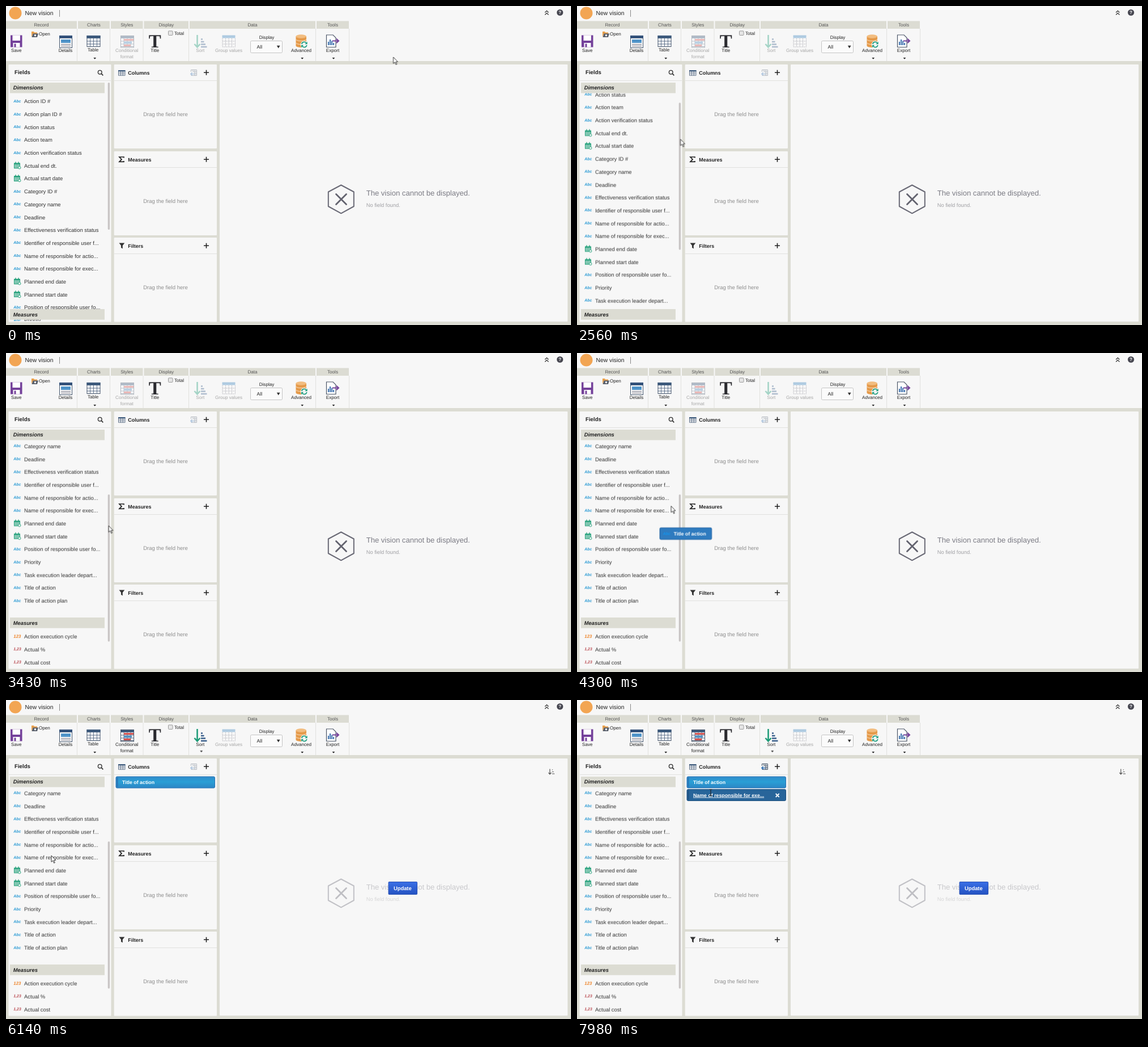
Animation of 997 by 562 pixels, one loop 8000 ms. Source, as an HTML page:

```html
<!DOCTYPE html>
<html lang="en">
<head>
<meta charset="utf-8">
<title>New vision</title>
<style>
html, body { margin: 0; width: 100%; height: 100%; overflow: hidden; background: #dcdcd3; }
svg { display: block; width: 997px; height: 562px; }
text { font: 9.45px "Liberation Sans", Arial, sans-serif; fill: #333; text-rendering: geometricPrecision; white-space: pre; }
.tool text { font-size: 8.1px; text-anchor: middle; fill: #222; }
.tool .tab { fill: #555; }
.left text, text.left { text-anchor: start; }
text.head { font-weight: bold; font-size: 8.95px; fill: #222; }
text.group { font-weight: bold; font-style: italic; font-size: 9.4px; fill: #222; }
text.hint { fill: #8e8e8e; font-size: 9.55px; text-anchor: middle; }
text.kind { font-weight: bold; font-style: italic; font-size: 6.9px; }
text.chip { font-weight: bold; font-size: 8.8px; fill: #fff; }
.panel { fill: #f7f7f7; }
.rule { stroke: #e1e1de; fill: none; }
.bar { fill: #dcdcd3; }
.dim { opacity: .38; }

/* one loop lasts 8 s, so 1% is 80 ms */
.cursor, .ghost { animation: move 8s linear infinite; }
.ghost { animation-delay: 70ms; }
.list { animation: list 8s linear infinite; }
.thumb { animation: thumb 8s linear infinite; }
.sum { animation: sum 8s linear infinite; }
.drop1, .undrop1, .wake, .msg, .wake2, .drop2, .drag1, .drag2, .slot1, .slot2, .arrow, .beam, .hover1 { animation: 8s step-end infinite; }
.drop1 { animation-name: drop1; }
.undrop1 { animation-name: undrop1; }
.wake { animation-name: wake; }
.msg { animation-name: msg; }
.wake2 { animation-name: wake2; }
.drop2 { animation-name: drop2; }
.drag1 { animation-name: drag1; }
.drag2 { animation-name: drag2; }
.slot1 { animation-name: slot1; }
.slot2 { animation-name: slot2; }
.arrow { animation-name: arrow; }
.beam { animation-name: beam; }
.hover1 { animation-name: hover1; }

@keyframes move {
  0%, 10.6% { transform: translate(683.5px, 90px); }
  13% { transform: translate(600px, 108px); }
  17% { transform: translate(330px, 168px); }
  20.4% { transform: translate(193px, 188px); }
  24.2%, 27% { transform: translate(182px, 189px); }
  28.125% { transform: translate(182px, 197px); }
  35.875% { transform: translate(183px, 272px); }
  40% { transform: translate(183px, 308px); }
  42.875% { transform: translate(181.5px, 304px); }
  47.1%, 49.4% { transform: translate(64px, 409px); }
  55% { transform: translate(195px, 230px); }
  57.6% { transform: translate(249px, 153px); }
  60%, 63% { transform: translate(254px, 153px); }
  68.1% { transform: translate(125px, 235px); }
  75%, 79.5% { transform: translate(80px, 274px); }
  82%, 84.4% { transform: translate(92px, 277px); }
  88% { transform: translate(180px, 235px); }
  88.875% { transform: translate(212px, 212px); }
  90.6% { transform: translate(234px, 174px); }
  92%, 100% { transform: translate(236px, 163px); }
}
@keyframes list {
  0%, 27.7% { transform: none; }
  28.125% { transform: translateY(-1px); }
  35.875% { transform: translateY(-113.3px); }
  40%, 100% { transform: translateY(-185.3px); }
}
@keyframes thumb {
  0%, 27.7% { transform: none; }
  28.125% { transform: translateY(.6px); }
  35.875% { transform: translateY(70px); }
  40%, 100% { transform: translateY(114.3px); }
}
@keyframes sum {
  0%, 35.86% { transform: translateY(534px); }
  35.87% { transform: translateY(538px); }
  40%, 100% { transform: translateY(466px); }
}
@keyframes drop1 { 0% { opacity: 0; } 61.75%, 100% { opacity: 1; } }
@keyframes undrop1 { 0% { opacity: 1; } 61.75%, 100% { opacity: 0; } }
@keyframes wake { 0% { opacity: .38; } 61.75%, 100% { opacity: 1; } }
@keyframes msg { 0% { opacity: 1; } 61.75%, 100% { opacity: .38; } }
@keyframes wake2 { 0% { opacity: .35; } 94.5%, 100% { opacity: 1; } }
@keyframes drop2 { 0% { opacity: 0; } 94.5%, 100% { opacity: 1; } }
@keyframes drag1 { 0% { opacity: 0; } 50% { opacity: 1; } 61.75%, 100% { opacity: 0; } }
@keyframes drag2 { 0% { opacity: 0; } 84.6% { opacity: .93; } 94.5%, 100% { opacity: 0; } }
@keyframes slot1 { 0% { opacity: 0; } 55.2% { opacity: 1; } 61.75%, 100% { opacity: 0; } }
@keyframes slot2 { 0% { opacity: 0; } 89.3% { opacity: 1; } 94.5%, 100% { opacity: 0; } }
@keyframes arrow { 0% { opacity: 1; } 61.75% { opacity: 0; } 63.3% { opacity: 1; } 84%, 100% { opacity: 0; } }
@keyframes beam { 0% { opacity: 0; } 61.75% { opacity: 1; } 63.3% { opacity: 0; } 84%, 100% { opacity: 1; } }
@keyframes hover1 { 0% { opacity: 0; } 61.75% { opacity: 1; } 63.3%, 100% { opacity: 0; } }
</style>
</head>
<body>
<svg viewBox="0 0 997 562">
  <defs>
    <clipPath id="rows"><rect x="5" y="153.5" width="170" height="401"/></clipPath>
    <linearGradient id="blue" x2="0" y2="1"><stop stop-color="#2f8bcb"/><stop offset=".45" stop-color="#2a9fd5"/><stop offset="1" stop-color="#2c86c5"/></linearGradient>
    <linearGradient id="btn" x2="0" y2="1"><stop stop-color="#3a6fe6"/><stop offset="1" stop-color="#2553c2"/></linearGradient>
    <g id="grid">
      <rect x=".5" y=".5" width="23" height="19" fill="#fff" stroke="#44546a"/>
      <rect width="24" height="5" fill="#3d5a7c"/>
      <path d="M0 10H24M0 15H24M6 5V20M12 5V20M18 5V20" stroke="#5c6f88" fill="none"/>
    </g>
    <g id="cal" fill="none" stroke="#23a07a">
      <path d="M.6 2.6H10.4V11H.6Z" stroke-width="1.2"/>
      <path d="M.5 3.6H10.5" stroke-width="2"/>
      <path d="M3 0V3M8 0V3" stroke-width="1.4"/>
      <path d="M.5 6.3H10.5M.5 8.7H10.5M3.2 4V11M5.6 4V11M8 4V11" stroke-width=".8"/>
      <circle cx="9.8" cy="10.2" r="2.2" fill="#f7f7f7"/>
    </g>
    <path id="caret" d="M-2.4 -1.3H2.4L0 1.5Z" fill="#222"/>
    <path id="plus" d="M-4.5 0H4.5M0 -4.5V4.5" stroke="#222" stroke-width="1.6"/>
  </defs>

  <rect class="panel" width="997" height="97"/>
  <circle cx="16.5" cy="12.5" r="11" fill="#f2a553"/>
  <text x="33.5" y="16.3" style="font-size:10.35px;fill:#222">New vision</text>
  <path d="M94.5 7V19" stroke="#888"/>
  <path d="M951 11.5L954.2 8.5L957.4 11.5M951 15.5L954.2 12.5L957.4 15.5" fill="none" stroke="#444" stroke-width="1.4"/>
  <circle cx="977.5" cy="11.5" r="5.6" fill="#484852"/>
  <text x="977.5" y="14.4" style="font-size:8px;font-weight:bold;fill:#fff;text-anchor:middle">?</text>

  <g class="tool">
    <g id="tabs"></g>
    <g fill="none">
      <path d="M8 51.5H28.5V72.5H8Z" fill="#74419a"/>
      <path d="M11.5 51.5H25V61H11.5Z" fill="#fff"/>
      <path d="M12.5 65H24.5V72.5H12.5Z" fill="#fff"/>
      <path d="M14.5 66.5H17.5V72.5H14.5Z" fill="#74419a"/>
    </g>
    <text x="18.3" y="81">Save</text>
    <path d="M45 45H49L50 46.5H55V49H47.5L45 54.5Z" fill="#e8a04c"/>
    <path d="M47.6 48.5H57L55 55H45.5Z" fill="#59606c"/>
    <circle cx="51.5" cy="51.7" r="1.7" fill="#fff"/>
    <text class="left" x="58" y="52">Open</text>
    <g>
      <rect x="94.5" y="52.5" width="22" height="21" fill="#fff" stroke="#41536a"/>
      <rect x="94" y="52" width="23" height="5" fill="#34527a"/>
      <rect x="97" y="59" width="17" height="6" fill="#4f93c8"/>
      <path d="M97 67.5H114M97 70.5H114" stroke="#667"/>
    </g>
    <text x="105" y="81">Details</text>
    <use href="#grid" x="142.5" y="52"/>
    <text x="153.7" y="80.3">Table</text>
    <use href="#caret" x="156.7" y="92.3"/>

    <g class="wake">
      <use href="#grid" x="202" y="52"/>
      <path d="M208 59.5H225M208 69.5H220" stroke="#d9534f" stroke-width="3"/>
      <path d="M208 64.5H222" stroke="#4f93c8" stroke-width="3"/>
      <rect x="202.5" y="52.5" width="23" height="20.5" fill="none" stroke="#44546a"/>
      <text x="213.3" y="81">Conditional</text>
      <text x="213.3" y="92">format</text>
    </g>

    <text x="262.8" y="73" style="font:bold 33px 'Liberation Serif',Times,serif;fill:#2b2b30">T</text>
    <text x="262.8" y="81">Title</text>
    <rect x="286.5" y="44" width="7.5" height="7.5" rx="1" fill="#e6e6e6" stroke="#9a9a9a"/>
    <text class="left" x="297" y="51.3">Total</text>

    <g class="wake">
      <path d="M337.5 51V72M332.5 67L337.5 72.5L342.5 67" fill="none" stroke="#1f9c78" stroke-width="2.6"/>
      <path d="M344 58.5H347M344 63H349.5M344 67.5H352M344 72H354.5" stroke="#3a5f8c" stroke-width="2.4"/>
      <text x="342.8" y="81">Sort</text>
    </g>
    <use class="drop1" href="#caret" x="344.7" y="90.5"/>
    <g class="dim">
      <rect x="381.5" y="51.5" width="23" height="5" fill="#3d86c0"/>
      <path d="M382 57V72H404.5V57M382 62H404M382 67H404M387.5 57V72M393 57V72M398.5 57V72" fill="none" stroke="#667" stroke-dasharray="2 1"/>
      <text x="393" y="81">Group values</text>
    </g>
    <text x="460" y="58.3">Display</text>
    <rect x="431.5" y="61.5" width="56" height="21" rx="2" fill="#fbfbfb" stroke="#c4c4c4"/>
    <text x="447.3" y="75" style="font-size:8.6px">All</text>
    <path d="M477.8 69.8H483.6L480.7 74.4Z" fill="#333"/>
    <g>
      <path d="M511.5 53.5V70C511.5 74 530 74 530 70V53.5Z" fill="#e59a4a"/>
      <ellipse cx="520.7" cy="53.5" rx="9.2" ry="3.2" fill="#f2bd80"/>
      <path d="M511.5 59C513 62.5 528 62.5 530 59M511.5 65C513 68.5 528 68.5 530 65" fill="none" stroke="#fbe3c6"/>
      <circle cx="526.3" cy="68" r="6.6" fill="#f7f7f7"/>
      <path d="M521.8 67A4.6 4.6 0 0 1 530.2 65.6M530.8 69A4.6 4.6 0 0 1 522.4 70.4" fill="none" stroke="#25a184" stroke-width="1.8"/>
      <path d="M531.7 62.7V67.2H527.4ZM520.9 73.3V68.8H525.2Z" fill="#25a184"/>
    </g>
    <text x="521" y="81">Advanced</text>
    <use href="#caret" x="522.7" y="92.3"/>
    <path d="M565.5 51H577L582 56V72.5H565.5Z" fill="#fff" stroke="#4b5566" stroke-width="1.2"/>
    <path d="M569 69V63M572 69V59M575 69V61.5M578 69V65" stroke="#3a6fae" stroke-width="2"/>
    <path d="M576 61.5H586M583 57.8L587 61.5L583 65.2" fill="none" stroke="#74419a" stroke-width="2"/>
    <text x="576.5" y="80.5">Export</text>
    <use href="#caret" x="578" y="92.3"/>
  </g>

  <!-- fields -->
  <rect class="panel" x="4.5" y="103" width="181" height="453.5" rx="1"/>
  <path class="rule" d="M5 131.5H185"/>
  <text class="head" x="15" y="120.3" style="font-size:9.7px">Fields</text>
  <circle cx="165.7" cy="116.7" r="3.3" fill="none" stroke="#333" stroke-width="1.4"/>
  <path d="M168.2 119.2L171.3 122.3" stroke="#333" stroke-width="1.7"/>
  <g clip-path="url(#rows)"><g class="list" id="list"></g></g>
  <rect class="bar" x="7" y="135" width="167" height="18.5"/>
  <text class="group" x="12.7" y="147.2">Dimensions</text>
  <g class="sum">
    <rect class="bar" x="7" width="167" height="18.7"/>
    <text class="group" x="12.7" y="12.8">Measures</text>
  </g>
  <rect class="thumb" x="179.7" y="135" width="3.4" height="259" rx="1.5" fill="#c9c5c5"/>

  <!-- drop areas -->
  <g id="areas"></g>
  <g transform="translate(198 113)">
    <path d="M.5 .5H12V9.5H.5ZM.5 4H12M.5 6.8H12M4.3 .5V9.5M8.2 .5V9.5" fill="#fff" stroke="#5d6f86" stroke-width=".9"/>
    <path d="M0 1.2H12.5" stroke="#3d5a7c" stroke-width="2.2"/>
  </g>
  <g class="wake2" fill="none" stroke="#3c4c60">
    <path d="M326.5 112.5H336.5V122.5H326.5M326.5 112.5V116M330 112.5V116M333.3 112.5V122.5M330 116H336.5M330 119.4H336.5"/>
    <path d="M332.5 119.7H326M328.6 116.9L325.8 119.7L328.6 122.5" stroke="#2b6cb0" stroke-width="1.4"/>
  </g>
  <path d="M208 267.5V266H200L204 270.2L200 274.4H208V273" fill="none" stroke="#222" stroke-width="1.7"/>
  <path d="M199.5 417.5H209.3L205.8 422V427.5L203 425.7V422Z" fill="#333"/>

  <text class="hint undrop1" x="281.5" y="194.4">Drag the field here</text>
  <g fill="#a3bdd5" stroke="#5f8fb8">
    <rect class="slot1" x="194" y="135" width="174.5" height="20" rx="2"/>
    <rect class="slot2" x="194" y="157.5" width="174.5" height="20" rx="2"/>
  </g>
  <g class="drop1">
    <rect x="194" y="135" width="174.5" height="20" rx="2" fill="url(#blue)" stroke="#2a74b4"/>
    <rect x="195" y="136.5" width="2.6" height="17" fill="#2a78b9"/>
    <text class="chip" x="205" y="148">Title of action</text>
  </g>
  <g class="hover1">
    <rect x="194" y="135" width="174.5" height="20" rx="2" fill="#28659a" stroke="#1d4f7c"/>
    <text class="chip" x="205" y="148" text-decoration="underline">Title of action</text>
    <path d="M350.7 142L356.7 148M356.7 142L350.7 148" stroke="#fff" stroke-width="1.8"/>
  </g>
  <g class="drop2">
    <rect x="194" y="157.5" width="174.5" height="20" rx="2" fill="#28659a" stroke="#1d4f7c"/>
    <rect x="195" y="159" width="2.6" height="17" fill="#1f5485"/>
    <text class="chip" x="205" y="170.6" text-decoration="underline">Name of responsible for exe...</text>
    <path d="M350.7 165L356.7 171M356.7 165L350.7 171" stroke="#fff" stroke-width="1.8"/>
  </g>

  <!-- vision -->
  <rect class="panel" x="377" y="103" width="614" height="453" rx="1"/>
  <g class="msg">
    <path d="M591.3 315.5L613.8 327.5V353L591.3 365.3L568.8 353V327.5Z" fill="none" stroke="#6a6a76" stroke-width="2" stroke-linejoin="round"/>
    <path d="M582.5 331.5L600.5 349.5M600.5 331.5L582.5 349.5" stroke="#62626e" stroke-width="2.8" stroke-linecap="round"/>
    <text x="635.7" y="334.3" style="font-size:13.07px;fill:#7b7b84">The vision cannot be displayed.</text>
    <text x="635.7" y="354" style="font-size:9.3px;fill:#a0a0a4">No field found.</text>
  </g>
  <g class="drop1">
    <path d="M959.7 121.5V130.5M957.2 128L959.7 130.8L962.2 128M963.5 123H965M963.5 126.5H966.5M963.5 130H968" fill="none" stroke="#555" stroke-width="1.2"/>
    <rect x="675" y="320.5" width="50.5" height="22" rx="1" fill="url(#btn)" stroke="#2a52b4"/>
    <text class="chip" x="699.8" y="334.8" style="font-size:9.4px;text-anchor:middle">Update</text>
  </g>

  <!-- dragged fields -->
  <g class="drag1"><g class="ghost">
    <rect x=".5" y="10.3" width="91.5" height="20.7" rx="2" fill="#2f7bbf" stroke="#2565a3"/>
    <text class="kind" x="6" y="23.3" style="fill:#1296f0">Abc</text>
    <text class="chip" x="25" y="24">Title of action</text>
  </g></g>
  <g class="drag2"><g class="ghost">
    <rect x=".7" y="10.5" width="179" height="34.2" rx="2.5" fill="#366a99" stroke="#1f4f7d"/>
    <text class="kind" x="10" y="23.3" style="fill:#18a0ee">Abc</text>
    <text class="chip" x="4" y="38">Name of responsible for execution</text>
  </g></g>

  <g class="cursor">
    <path class="arrow" d="M0 0V11.3L2.6 8.9L4.6 13.3L6.3 12.5L4.4 8.3H7.8Z" fill="#fff" stroke="#222" stroke-width=".9"/>
    <path class="beam" d="M-2.5 -5.5H-.8L0 -4.8L.8 -5.5H2.5M0 -4.8V4.8M-2.5 5.5H-.8L0 4.8L.8 5.5H2.5" fill="none" stroke="#222" stroke-width="1.1"/>
  </g>
</svg>
<script>
const put = (id, html) => document.getElementById(id).innerHTML = html;

const tabs = [["Record", 0, 125], ["Charts", 127, 183], ["Styles", 185, 241.5],
  ["Display", 243.5, 322], ["Data", 324, 546], ["Tools", 548, 605]];
put("tabs", tabs.map(([name, a, b]) =>
  `<rect class="bar" x="${a}" y="26.5" width="${b - a}" height="13.5"/>
   <text class="tab" x="${(a + b) / 2}" y="36">${name}</text>
   <path class="rule" d="M${b + .5} 40V97"/>`).join(""));

const areas = [["Columns", 103, 148], ["Measures", 256, 148], ["Filters", 408, 148.5]];
put("areas", areas.map(([name, y, h], i) =>
  `<rect class="panel" x="190.7" y="${y}" width="181.3" height="${h}" rx="1"/>
   <path class="rule" d="M191 ${y + 28.5}H372"/>
   <text class="head" x="215.3" y="${y + 17.7}">${name}</text>
   <use href="#plus" x="353.5" y="${y + 14.3}"/>
   ${i ? `<text class="hint" x="281.5" y="${y + 91.3}">Drag the field here</text>` : ""}`).join(""));

const dimensions = ["Action ID #", "Action plan ID #", "Action status", "Action team",
  "Action verification status", "Actual end dt.", "Actual start date", "Category ID #",
  "Category name", "Deadline", "Effectiveness verification status",
  "Identifier of responsible user f...", "Name of responsible for actio...",
  "Name of responsible for exec...", "Planned end date", "Planned start date",
  "Position of responsible user fo...", "Priority", "Task execution leader depart...",
  "Title of action", "Title of action plan"];
const measures = ["Action execution cycle", "Actual %", "Actual cost"];
const step = 22.68;

const kind = (label, color, y, size) =>
  `<text class="kind" x="13.3" y="${y + 2}" style="fill:${color};font-size:${size}px">${label}</text>`;
const row = (name, y, icon) => `${icon}<text x="32" y="${y + 3.4}">${name}</text>`;

put("list", dimensions.map((name, i) => {
  const y = 168 + i * step;
  const isDate = /^(Actual|Planned)/.test(name);
  return row(name, y, isDate ? `<use href="#cal" x="14" y="${y - 6.8}"/>` : kind("Abc", "#2397d3", y, 6.9));
}).join("") + measures.map((name, i) => {
  const y = 684.8 + i * step;
  return row(name, y, i ? kind("1,23", "#b9484f", y, 6.9) : kind("123", "#ee8226", y + .4, 7.8));
}).join(""));
</script>
</body>
</html>
```
